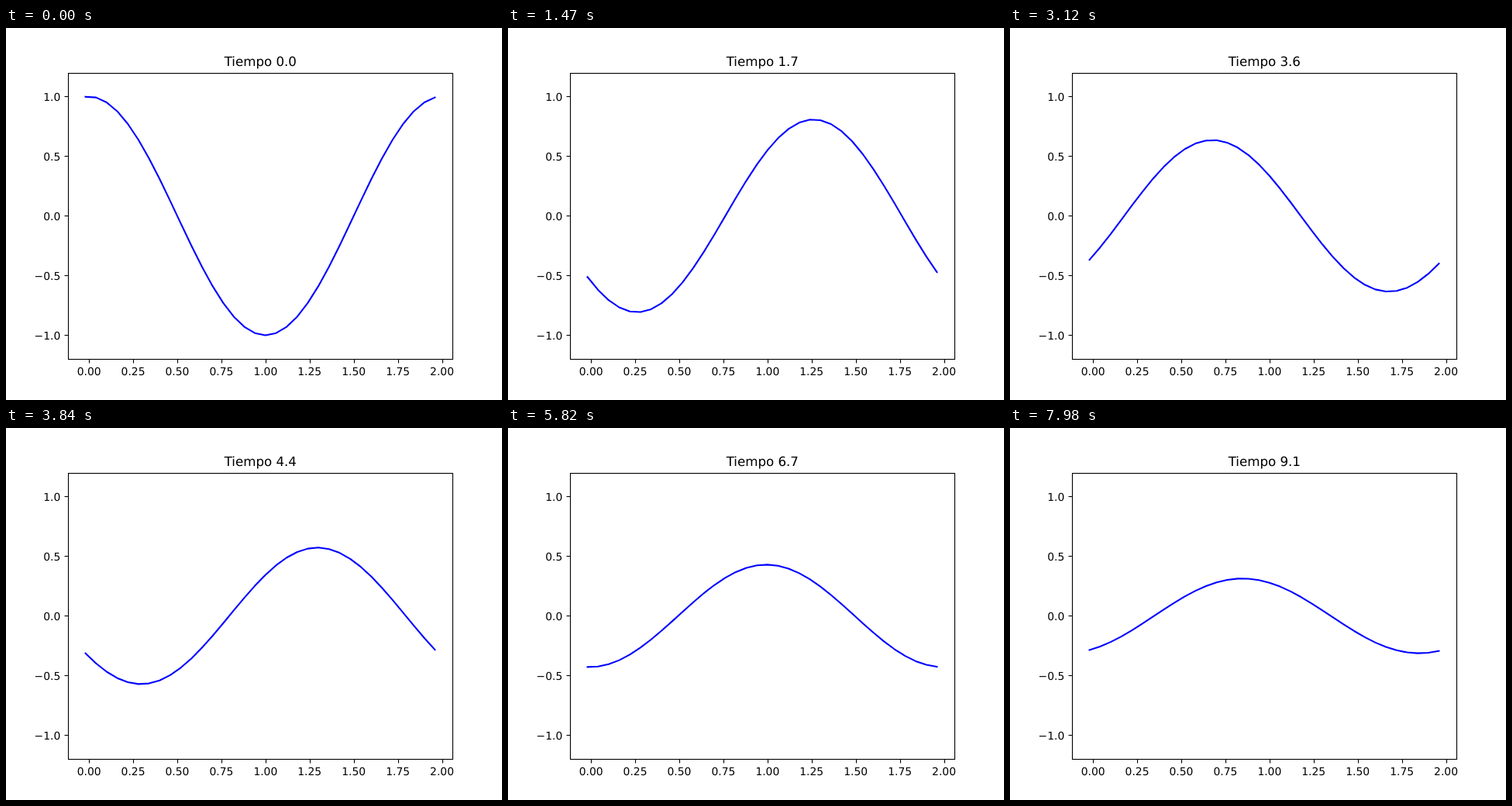
An HTML page that plays this animation: 640x480 px, repeating every 8 s.

```html
<!DOCTYPE html>
<html lang="es">
<head>
<meta charset="utf-8">
<title>Onda</title>
<style>
  html, body { margin: 0; width: 100%; height: 100%; overflow: hidden; background: #fff; }
  svg { display: block; width: 640px; height: 480px; }
  text { font: 13.889px "DejaVu Sans", sans-serif; fill: #000; text-rendering: geometricPrecision; }
  #title { font-size: 16.667px; text-anchor: middle; }
  .frame { fill: none; stroke: #000; stroke-width: 1.111; }
  #wave { fill: none; stroke: #00f; stroke-width: 2.083; stroke-linejoin: round; stroke-linecap: square; }
</style>
</head>
<body>
<svg viewBox="0 0 640 480">
  <path id="wave"/>
  <g id="axes"><rect class="frame" x="80.5" y="58.5" width="496" height="369"/></g>
  <text id="title" x="328.3" y="49"></text>
</svg>
<script>
const LOOP = 8000, STEP = 30;
const DT = 0.24 / 7;        // simulated time per step
const SHIFT = 0.02574;      // distance travelled per step
const DECAY = 0.004365;     // amplitude loss per step
const X0 = -0.02, DX = 0.06, POINTS = 34;

const axes = document.getElementById('axes');
const wave = document.getElementById('wave');
const title = document.getElementById('title');

const px = x => 80 + (x + 0.119) * 496 / 2.178;
const py = y => 242.4 - y * 154;
const snap = v => Math.round(v) + 0.5;

function add(tag, attrs, text = '') {
  const el = document.createElementNS(axes.namespaceURI, tag);
  for (const name in attrs) el.setAttribute(name, attrs[name]);
  el.textContent = text;
  axes.append(el);
}

for (let i = 0; i <= 8; i++) {
  const x = px(i / 4);
  add('path', { class: 'frame', d: `M${snap(x)} 427.5v5` });
  add('text', { x, y: 448, 'text-anchor': 'middle' }, (i / 4).toFixed(2));
}
for (let i = -2; i <= 2; i++) {
  const y = py(i / 2);
  add('path', { class: 'frame', d: `M80.5 ${snap(y)}h-5` });
  add('text', { x: 70.3, y: Math.round(y + 5.28), 'text-anchor': 'end' },
    (i / 2).toFixed(1).replace('-', '\u2212'));
}

let shown = -1;
function draw() {
  const n = Math.floor(performance.now() % LOOP / STEP);
  if (n !== shown) {
    shown = n;
    const amp = Math.exp(-DECAY * n);
    const points = Array.from({ length: POINTS }, (_, i) => {
      const x = X0 + i * DX;
      const y = amp * Math.cos(Math.PI * (x - SHIFT * n));
      return px(x).toFixed(2) + ' ' + py(y).toFixed(2);
    });
    wave.setAttribute('d', 'M' + points.join('L'));
    title.textContent = 'Tiempo ' + (n * DT).toFixed(1);
  }
  requestAnimationFrame(draw);
}
draw();
</script>
</body>
</html>
```
